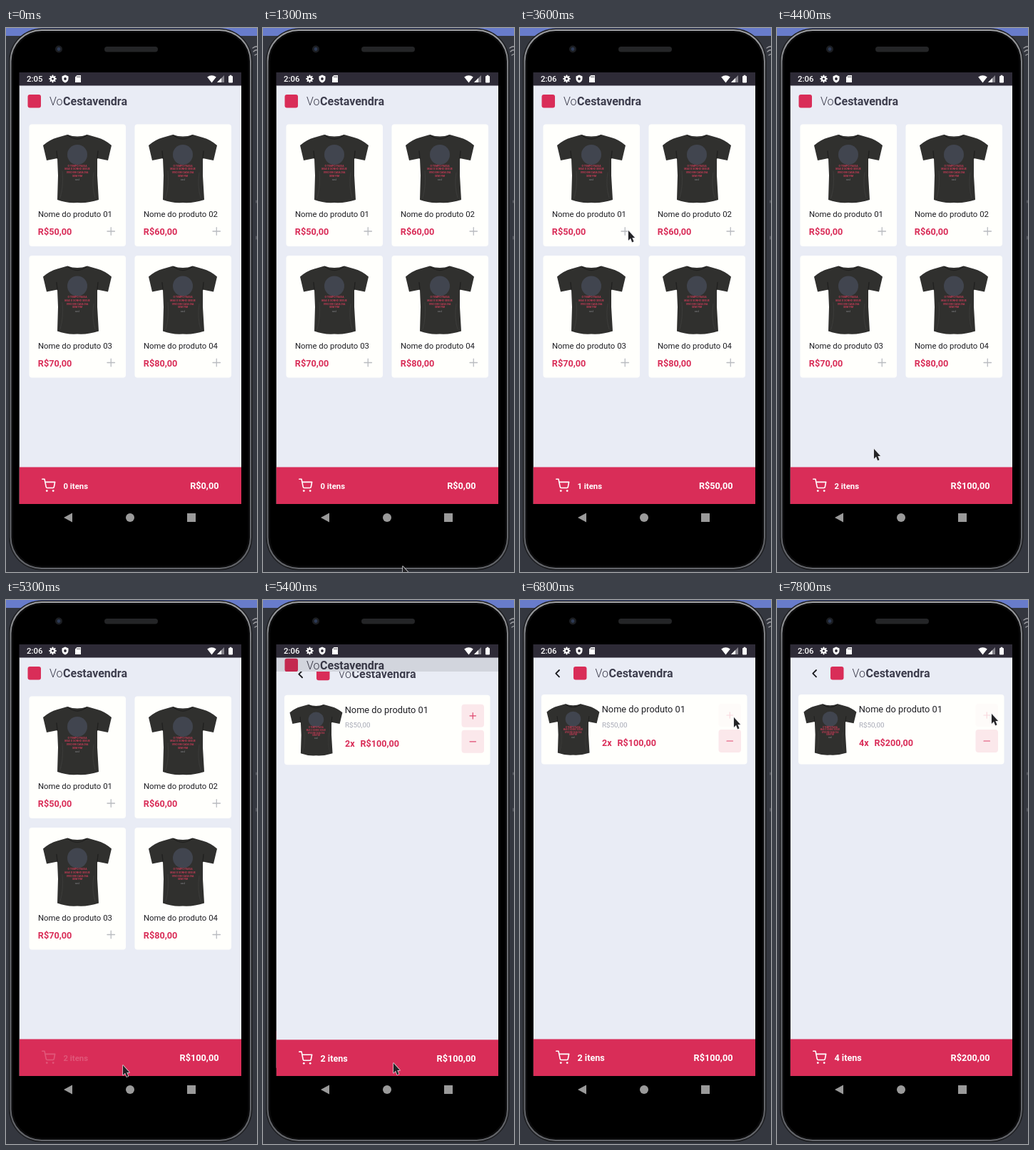
Write an HTML page with a canvas that moves like this. It is 352 px wide and 760 px high and loops after 8000 ms.

```html
<!DOCTYPE html>
<html lang="pt-BR">
<head>
<meta charset="utf-8">
<title>Loja</title>
<style>
html, body { margin: 0; width: 100%; height: 100%; overflow: hidden; background: #34373f; }
canvas { display: block; width: 352px; height: 760px; }
</style>
</head>
<body>
<canvas id="stage"></canvas>
<script>
const W = 352, H = 760, LOOP = 8000, STEP = 100;
const RED = '#d92d58', PAGE = '#e9ecf5', CARD = '#fffffc', INK = '#3d3d4d';
const canvas = document.getElementById('stage');
const c = canvas.getContext('2d');
const dpr = window.devicePixelRatio || 1;
canvas.width = W * dpr;
canvas.height = H * dpr;

// Pointer stops: time, x, y
const pointerPath = [
  [1300, 196, 752], [1800, 152, 283], [3900, 152, 283], [4400, 136, 588],
  [4800, 155, 647], [5200, 157, 648], [5300, 164, 650], [5400, 183, 647],
  [5900, 296, 172], [6200, 300, 164], [7300, 300, 164], [7500, 301, 159]
];
const homePresses = [[2400, 2550], [3600, 3750]];
const cartPresses = [[6600, 6900], [7350, 7500], [7650, 8200]];
const countTimes = [2700, 3800, 7000, 7600];

const clamp = v => Math.max(0, Math.min(1, v));
const money = n => 'R$' + n + ',00';

function fade(t, presses) {
  let alpha = 1;
  for (const [down, up] of presses) {
    if (t < down) continue;
    alpha = t < up ? 1 - 0.8 * clamp((t - down) / 120) : 0.2 + 0.8 * clamp((t - up) / 250);
  }
  return alpha;
}

function box(x, y, w, h, r, fill) {
  c.beginPath();
  c.roundRect(x, y, w, h, r);
  c.fillStyle = fill;
  c.fill();
}

function disc(x, y, r, fill) {
  c.beginPath();
  c.arc(x, y, r, 0, 7);
  c.fillStyle = fill;
  c.fill();
}

function poly(points, fill) {
  c.beginPath();
  points.forEach(([x, y]) => c.lineTo(x, y));
  c.closePath();
  c.fillStyle = fill;
  c.fill();
}

function stroke(d, color, width) {
  c.strokeStyle = color;
  c.lineWidth = width;
  c.lineCap = c.lineJoin = 'round';
  c.stroke(new Path2D(d));
}

function text(s, x, y, size, color, weight = 400, align = 'left') {
  c.font = `${weight} ${size}px Roboto, sans-serif`;
  c.textAlign = align;
  c.fillStyle = color;
  c.fillText(s, x, y);
}

function at(x, y, sx, sy, draw) {
  c.save();
  c.translate(x, y);
  c.scale(sx, sy);
  draw();
  c.restore();
}

function withAlpha(a, draw) {
  c.save();
  c.globalAlpha *= a;
  draw();
  c.restore();
}

function drawPhone() {
  c.fillStyle = '#34373f';
  c.fillRect(0, 0, W, H);
  c.fillStyle = '#687ccb';
  c.fillRect(0, 0, W, 11);
  stroke('M346 28q4-3 8-2M347 33q3-3 6-2M349 38q2-2 4-1', '#a0a1a6', 1.3);
  stroke('M351 241v3M351 291v4', '#6c6d74', 1.2);
  const rim = c.createLinearGradient(0, 0, 0, H);
  rim.addColorStop(0, '#a2a3a6');
  rim.addColorStop(0.08, '#77797d');
  rim.addColorStop(1, '#626469');
  box(4, 0.5, 341.5, 757, 46, '#1d1e21');
  box(5.5, 2, 338.5, 754, 44.5, rim);
  box(7.5, 4, 334.5, 750, 42.5, '#0b0b0c');
  box(10, 6.5, 329.5, 745, 40, '#000');
  disc(74, 29.5, 5, '#1c1e22');
  disc(74, 29.5, 2.4, '#2d3a55');
  box(138, 26, 75, 7.5, 3.7, '#242527');
  poly([[81, 684], [93, 677.5], [93, 690.5]], '#9a9a9a');
  disc(174, 684, 6, '#9a9a9a');
  c.fillRect(254, 678, 12, 12);
}

function drawStatus(clock) {
  c.fillStyle = '#2e2b37';
  c.fillRect(18.5, 62, 311.5, 18.5);
  text(clock, 29, 75.3, 11.4, '#fff', 500);
  for (let i = 0; i < 8; i++) {
    const a = i * Math.PI / 4;
    stroke(`M65.5 71l${4.4 * Math.cos(a)} ${4.4 * Math.sin(a)}`, '#fff', 2);
  }
  disc(65.5, 71, 3.7, '#fff');
  disc(65.5, 71, 1.6, '#2e2b37');
  c.fillStyle = '#fff';
  c.fill(new Path2D('M83 65.5l4.5 2v3.3q0 4-4.5 5.7q-4.5-1.7-4.5-5.7v-3.3z'));
  disc(83, 71, 1.9, '#2e2b37');
  poly([[99.5, 66], [105, 66], [105, 76], [97, 76], [97, 68.5]], '#fff');
  c.fillStyle = '#2e2b37';
  for (const x of [99.5, 101.3, 103.1]) c.fillRect(x, 67.3, 0.8, 2);
  c.fillStyle = '#fff';
  c.fill(new Path2D('M288.5 76.5l-6.3-8q6.3-4.6 12.6 0z'));
  poly([[306, 66], [306, 76], [296, 76]], '#86848c');
  poly([[302, 70], [302, 76], [296, 76]], '#fff');
  box(312, 67, 6, 9.5, 1, '#fff');
  c.fillRect(313.7, 65.8, 2.6, 2);
}

function drawBrand(x) {
  box(x, 93, 18.5, 18.5, 3, RED);
  text('Vo', x + 30.5, 108, 16, INK, 300);
  text('Cestavendra', x + 49.5, 108, 16, INK, 700);
}

// Shirt fills a 96 by 96 square
function drawShirt() {
  c.fillStyle = '#30302e';
  c.fill(new Path2D('M34 1Q48 6 62 1L76 5Q87 8 96 16L91 37L76 34L76 58L78 92Q63 97 48 96Q33 97 20 92L21 58L20 34L5 37L0 16Q9 8 20 5Z'));
  stroke('M35 2Q48 12 61 2M20 34L19 24M76 34L77 24', '#20201f', 1.4);
  stroke('M27 52Q29 72 24 89M71 54Q68 73 73 89', '#3a3a38', 1.2);
  disc(48, 29, 14, '#41454f');
  const lines = ['O TEMPO PASSA', 'MAS O SONHO SEGUE', 'VIVO EM CADA DIA', 'SEM FIM'];
  lines.forEach((s, i) => text(s, 48, 45.5 + i * 4.8, 3.5, '#c13b55', 700, 'center'));
  text('azul', 48, 65, 3.5, '#85858a', 400, 'center');
}

function drawFooter(count, size, alpha) {
  c.fillStyle = RED;
  c.fillRect(18.5, 613.5, 311.5, 51.5);
  withAlpha(alpha, () => {
    at(50, 629.5, 0.81, 0.81, () => {
      stroke('M1 1h4l2.7 13.4a2 2 0 0 0 2 1.6h9.7a2 2 0 0 0 2-1.6L23 6H6', '#fff', 2);
      disc(9, 21, 1.7, '#fff');
      disc(20, 21, 1.7, '#fff');
    });
    text(count + ' itens', 80.5, 643.8, size, '#fff', 700);
  });
  text(money(count * 50), 298.5, 644, 12.7, '#fff', 700, 'right');
}

function drawHome(t, count) {
  c.fillStyle = PAGE;
  c.fillRect(18.5, 80, 311.5, 585);
  drawBrand(30.5);
  for (let i = 0; i < 4; i++) {
    const x = 32.5 + (i % 2) * 148, y = 134.5 + (i >> 1) * 183.5;
    box(x, y, 135.5, 170.5, 4, CARD);
    at(x + 19.5, y + 13.5, 1, 1, drawShirt);
    text('Nome do produto 0' + (i + 1), x + 12.5, y + 129.5, 11.35, '#1f1f24');
    text(money(50 + i * 10), x + 12.3, y + 154.5, 12.7, RED, 700);
    withAlpha(i ? 1 : fade(t, homePresses), () =>
      stroke(`M${x + 109.5} ${y + 149.5}h10.5m-5.25-5.25v10.5`, '#b9bbc0', 1.3));
  }
  drawFooter(count, 11.35, fade(t, [[5140, 5400]]));
}

function drawButton(y, glyph) {
  box(278.5, y, 31.5, 32, 4, '#fbe8eb');
  stroke(`M290 ${y + 16}h8.5` + glyph, '#df4a70', 1.2);
}

function drawCart(t, count) {
  c.fillStyle = PAGE;
  c.fillRect(18.5, 80, 311.5, 600);
  stroke('M55 98l-4.7 4.7l4.7 4.7', '#18181c', 1.8);
  drawBrand(75);
  box(30, 132, 288.5, 97.5, 4, CARD);
  at(37.5, 144.5, 0.77, 0.75, drawShirt);
  text('Nome do produto 01', 114.7, 157.3, 12.8, '#1f1f24');
  text(money(50), 115, 177.5, 9.8, '#a6a8b5');
  text(count + 'x', 115, 204, 12.5, RED, 700);
  text(money(count * 50), 136.5, 204, 12.6, RED, 700);
  withAlpha(fade(t, cartPresses), () => drawButton(145, 'm-4.25-4.25v8.5'));
  drawButton(181, '');
  drawFooter(count, 12.6, 1);
}

function drawScreens(t, count) {
  const p = t < 5400 ? 0 : 1 - 0.034 * Math.exp(-(t - 5400) / 50);
  const edge = 80 + 585 * (1 - p);
  c.save();
  c.beginPath();
  c.rect(18.5, 80, 311.5, 585);
  c.clip();
  if (p < 0.999) {
    at(0, -11.7 * p, 1, 1, () => drawHome(t, count));
    c.fillStyle = `rgba(0,0,0,${0.1 * p})`;
    c.fillRect(18.5, 80, 311.5, 585);
  }
  if (p > 0) {
    c.beginPath();
    c.rect(18.5, edge, 311.5, 665 - edge);
    c.clip();
    at(0, 25 * (1 - p), 1, 1, () => drawCart(t, count));
  }
  c.restore();
}

function drawPointer(t) {
  if (t < pointerPath[0][0]) return;
  let i = pointerPath.findIndex(k => k[0] > t);
  if (i < 0) i = pointerPath.length;
  const a = pointerPath[i - 1], b = pointerPath[i] || a;
  const u = b === a ? 0 : (t - a[0]) / (b[0] - a[0]);
  const e = u * u * (3 - 2 * u);
  at(a[1] + (b[1] - a[1]) * e, a[2] + (b[2] - a[2]) * e, 0.9, 0.95, () => {
    const arrow = 'M0 0V14.5L3.4 11.4L5.8 17L8.3 16L5.9 10.5H10Z';
    stroke(arrow, '#e4e4e8', 1.5);
    c.fillStyle = '#232326';
    c.fill(new Path2D(arrow));
  });
}

function draw(now) {
  const t = Math.floor((now % LOOP) / STEP) * STEP;
  const count = countTimes.filter(k => t >= k).length;
  c.setTransform(dpr, 0, 0, dpr, 0, 0);
  drawPhone();
  drawScreens(t, count);
  drawStatus(t < 300 ? '2:05' : '2:06');
  drawPointer(t);
}

const start = performance.now();
function tick() {
  draw(performance.now() - start);
  requestAnimationFrame(tick);
}
tick();
</script>
</body>
</html>
```
